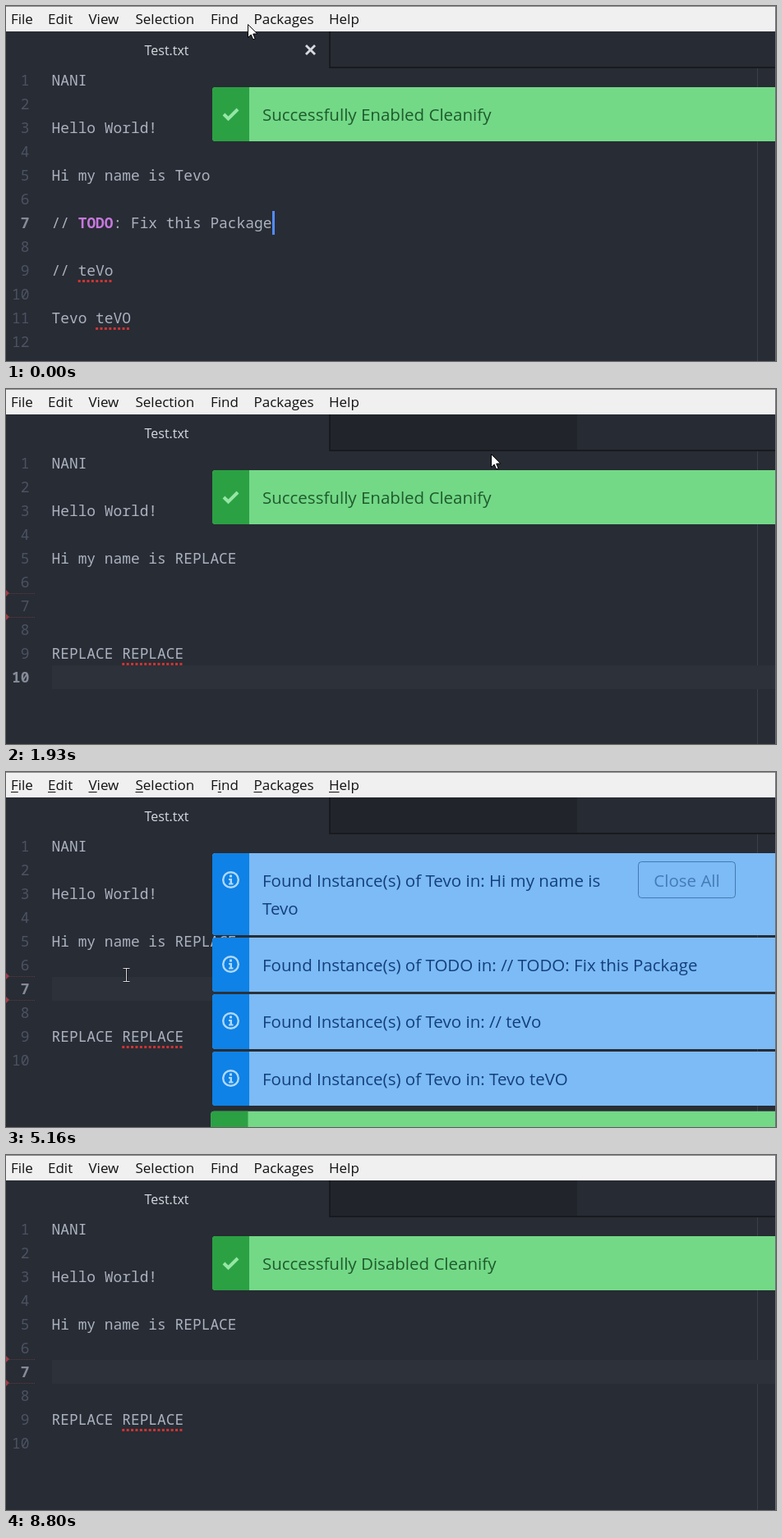
Recreate the animation shown at these times as an HTML page with a canvas. Size 937 by 433 pixels, loop 8890 ms.

```html
<!DOCTYPE html>
<html lang="en">
<head>
<meta charset="utf-8">
<title>Editor package demo</title>
<style>
  html, body { margin: 0; width: 100%; height: 100%; overflow: hidden; background: #282c34; }
  canvas { display: block; }
</style>
</head>
<body>
<canvas id="stage" width="937" height="433"></canvas>
<script>
const ctx = document.getElementById('stage').getContext('2d', { alpha: false });
const LOOP = 8890;
const UI = '"Open Sans", "Noto Sans", sans-serif';
const MONO = '17.87px "Noto Sans Mono", "DejaVu Sans Mono", monospace';
const MENU_FONT = `17px ${UI}`;
const TOAST_FONT = `20.5px ${UI}`;
const CHAR = 10.72, LINE = 29, TEXT_X = 55.5;
const TOAST_TOP = 98.7, TOAST_HEIGHT = 66.4, TOAST_GAP = 2.93, TOAST_ROW = 34;

// Moments at which the scene changes, in ms
const MENU_OPEN = 350, SUBMENU_OPEN = 1120, TRIGGERED = 1930, LINE_CLICK = 3860;
const ALT_DOWN = 4500, ALT_UP = 5600;
const CARET_TOGGLES = [0, 1930, 2540, 2950, 3350, 3750, 3860, 4220, 4560, 4900, 5240,
  5600, 5980, 6400, 6780, 7160, 7530, 7960, 8420, 8795];

const MOUSE_PATH = [
  [0, 294, 22], [90, 294, 22], [350, 345, 14], [790, 369, 82], [1140, 369, 82],
  [1440, 591, 79], [1690, 590, 79], [1930, 590, 79], [2390, 696, 362], [2540, 696, 362],
  [2630, 697, 363], [2910, 697, 363], [3770, 135, 250], [4830, 135, 250], [4920, 146, 247],
  [5900, 146, 247], [6150, 260, 212], [6520, 857, 406], [6745, 857, 406], [7050, 890, 445]
];

const MENU_BAR = [['File', 6, 0], ['Edit', 51, 0], ['View', 100.5, 0], ['Selection', 157.5, 0],
  ['Find', 249, 1], ['Packages', 301.5, 0], ['Help', 393, 0]];
const PACKAGES = ['Bracket Matcher', 'Cleanify', 'Command Palette', 'Dev Live Reload', 'Git Diff',
  'GitHub', 'Keybinding Resolver', 'Markdown Preview', 'Open On GitHub', 'Package Generator',
  'Settings View'];

const BEFORE = ['NANI', '', 'Hello World!', '', 'Hi my name is Tevo', '',
  '// TODO: Fix this Package', '', '// teVo', '', 'Tevo teVO', ''];
const AFTER = ['NANI', '', 'Hello World!', '', 'Hi my name is REPLACE', '', '', '',
  'REPLACE REPLACE', ''];

const SUCCESS = { icon: '#2ba143', body: '#73d987', text: '#1f5a2c', mark: '#95e6a4' };
const INFO = { icon: '#0e82e6', body: '#7cbbf5', text: '#143f7c', mark: '#b0d8fb' };
const found = (text, dies) => ({ style: INFO, text: `Found Instance(s) of ${text}`, born: 2010, dies });
const TOASTS = [
  { style: SUCCESS, text: 'Successfully Enabled Cleanify', born: -1000, dies: 3700 },
  found('Tevo in: Hi my name is\nTevo', 6732),
  found('TODO in: // TODO: Fix this Package', 6735.5),
  found('Tevo in: // teVo', 6735.5),
  found('Tevo in: Tevo teVO', 6735.5),
  { style: SUCCESS, text: 'Successfully Disabled Cleanify', born: 5065, dies: Infinity }
];

const clamp = v => Math.min(1, Math.max(0, v));
const smooth = v => v * v * (3 - 2 * v);
const backOut = v => 1 + 2.7 * (v - 1) ** 3 + 1.7 * (v - 1) ** 2;

function rect(x, y, w, h, color) {
  ctx.fillStyle = color;
  ctx.fillRect(x, y, w, h);
}

function text(str, x, y, font, color, align = 'left') {
  ctx.font = font;
  ctx.fillStyle = color;
  ctx.textAlign = align;
  ctx.fillText(str, x, y);
}

function polygon(points, color) {
  ctx.beginPath();
  points.forEach(([x, y]) => ctx.lineTo(x, y));
  ctx.closePath();
  ctx.fillStyle = color;
  ctx.fill();
}

function polyline(points, color, width) {
  ctx.beginPath();
  points.forEach(([x, y]) => ctx.lineTo(x, y));
  ctx.strokeStyle = color;
  ctx.lineWidth = width;
  ctx.stroke();
}

function mouseAt(t) {
  const i = MOUSE_PATH.findIndex(key => key[0] > t);
  if (i < 0) return MOUSE_PATH.at(-1).slice(1);
  const [t0, x0, y0] = MOUSE_PATH[i - 1], [t1, x1, y1] = MOUSE_PATH[i];
  const k = smooth((t - t0) / (t1 - t0));
  return [x0 + (x1 - x0) * k, y0 + (y1 - y0) * k];
}

function drawTabs(t) {
  rect(0, 0, 937, 433, '#282c34');
  rect(395, 31, 542, 44, '#272b33');
  if (t >= TRIGGERED) rect(395, 31, 300, 44, '#21252b');
  rect(393, 31, 2, 45, '#181a1f');
  rect(393, 74, 544, 2, '#181a1f');
  text('Test.txt', 195.5, 60, `500 16px ${UI}`, '#d7dae0', 'center');
  if (t < MENU_OPEN) {
    polyline([[365, 48], [376, 59]], '#d7dae0', 2.8);
    polyline([[376, 48], [365, 59]], '#d7dae0', 2.8);
  }
}

function misspelled(line, column, length) {
  const y = 74.5 + LINE * line;
  ctx.setLineDash([3, 2.4]);
  polyline([[TEXT_X + column * CHAR, y], [TEXT_X + (column + length) * CHAR, y]], '#cf3434', 3);
  ctx.setLineDash([]);
}

function drawEditor(t) {
  const edited = t >= TRIGGERED;
  const lines = edited ? AFTER : BEFORE;
  const active = edited && t < LINE_CLICK ? 10 : 7;
  const activeY = 76 + LINE * (active - 1);

  rect(914, 76, 1, 357, '#3a3f49');
  if (edited) {
    rect(56, activeY, 881, LINE, '#2c313a');
    for (const y of [249, 278]) {
      polygon([[0, y - 4], [4, y], [0, y + 4]], '#9c3d45');
      ctx.setLineDash([1, 1]);
      polyline([[4, y + .5], [35, y + .5]], '#5c3a42', 1);
      ctx.setLineDash([]);
    }
  }
  lines.forEach((line, i) => {
    const y = 97 + LINE * i;
    const isActive = i + 1 === active;
    text(i + 1, 28.5, y, `${isActive ? 600 : 400} ${MONO}`, isActive ? '#858b98' : '#4b5263', 'right');
    text(line.replace('TODO', '    '), TEXT_X, y, `500 ${MONO}`, '#abb2bf');
    const todo = line.indexOf('TODO');
    if (todo >= 0) text('TODO', TEXT_X + todo * CHAR, y, `600 ${MONO}`, '#c678dd');
  });
  if (edited) {
    misspelled(9, 8, 7);
  } else {
    misspelled(9, 3, 4);
    misspelled(11, 5, 4);
  }
  const toggles = CARET_TOGGLES.filter(time => time <= t).length;
  if (toggles % 2) rect(edited ? 56 : 324, activeY, 3, LINE, '#528bff');
}

function drawToast({ style, text: message, born, dies }, y, height, withButton, t) {
  const show = backOut(clamp((t - born) / 160));
  const hide = clamp((t - dies) / 120);
  const left = 251, width = 692, midX = left + width / 2, midY = y + height / 2;
  const scale = 1 - .2 * hide;

  ctx.save();
  ctx.globalAlpha = clamp(show) * (1 - hide);
  ctx.translate(midX, midY + 34 * (show - 1));
  ctx.scale(scale * (1 + .05 * (show - 1)), scale * Math.cos((1 - show) * Math.PI / 2));
  ctx.translate(-midX, -midY);

  ctx.beginPath();
  ctx.roundRect(left, y, width, height, 4);
  ctx.fillStyle = style.body;
  ctx.fill();
  ctx.beginPath();
  ctx.roundRect(left, y, 45, height, [4, 0, 0, 4]);
  ctx.fillStyle = style.icon;
  ctx.fill();

  if (style === SUCCESS) {
    polyline([[265, y + 33], [270.5, y + 38.5], [282, y + 27]], style.mark, 4);
  } else {
    ctx.beginPath();
    ctx.arc(273.5, y + 32.5, 9.3, 0, 7);
    ctx.strokeStyle = style.mark;
    ctx.lineWidth = 2.4;
    ctx.stroke();
    rect(272, y + 26.5, 3, 3, style.mark);
    rect(271, y + 31, 4, 2, style.mark);
    rect(272.5, y + 31, 2.5, 7, style.mark);
    rect(271, y + 36.5, 5.5, 2, style.mark);
  }

  const rows = height > 70 ? message.split('\n') : [message.replace('\n', ' ')];
  rows.forEach((row, i) => text(row, 312, y + 41 + TOAST_ROW * i, TOAST_FONT, style.text));

  if (withButton) {
    ctx.globalAlpha *= .52;
    ctx.beginPath();
    ctx.roundRect(769.5, y + 10.5, 118, 44, 4);
    ctx.strokeStyle = style.text;
    ctx.lineWidth = 1;
    ctx.stroke();
    text('Close All', 828.5, y + 41, TOAST_FONT, style.text, 'center');
  }
  ctx.restore();
}

// A closed toast fades for 120 ms, then its slot collapses at the end of the next 240 ms.
function drawToasts(t) {
  const present = TOASTS.filter(toast => t >= toast.born && t < toast.dies + 360);
  let y = TOAST_TOP;
  present.forEach((toast, i) => {
    const withButton = i === 0 && present.length > 1;
    const height = TOAST_HEIGHT + (withButton && toast.text.includes('\n') ? TOAST_ROW : 0);
    const top = Math.round(y), bottom = Math.round(y + height);
    drawToast(toast, top, bottom - top, withButton, t);
    y += (height + TOAST_GAP) * (1 - clamp((t - toast.dies - 310) / 50));
  });
}

function drawTooltip() {
  polygon([[188, 93], [195, 85], [202, 93]], '#4d78cc');
  ctx.beginPath();
  ctx.roundRect(-4, 93, 396, 50, 4);
  ctx.fillStyle = '#4d78cc';
  ctx.fill();
  text('C:\\Users\\nelvo\\Desktop\\dev\\C\\Test.txt', 17.5, 126, `19.5px ${UI}`, '#fff');
}

function drawMenuBar(t, open) {
  rect(0, 0, 937, 31, '#f0f0f0');
  if (open) {
    rect(293, 1, 92, 29, '#dadada');
    rect(385, 1, 160, 29, '#fff');
  }
  for (const [label, x, key] of MENU_BAR) {
    text(label, x, 22, MENU_FONT, '#111');
    if (t >= ALT_DOWN && t < ALT_UP) {
      const start = x + ctx.measureText(label.slice(0, key)).width;
      rect(start, 24, ctx.measureText(label[key]).width, 1, '#111');
    }
  }
}

function panel(x, y, w, h) {
  ctx.save();
  ctx.shadowColor = 'rgba(0,0,0,.6)';
  ctx.shadowBlur = 3;
  ctx.shadowOffsetX = ctx.shadowOffsetY = 2;
  rect(x, y, w, h, '#c8c8c8');
  ctx.restore();
  rect(x + 1, y + 1, w - 2, h - 2, '#fdfdfd');
}

function drawMenus(t, [mouseX, mouseY]) {
  panel(292, 28, 248, 420);
  if (mouseY >= 68) rect(294, 69, 241, 35, '#e9e9e9');
  else if (mouseY >= 32) rect(294, 33, 241, 35, '#e9e9e9');
  PACKAGES.forEach((label, i) => {
    const y = 51 + 36 * i;
    text(label, 333, y + 6, MENU_FONT, '#111');
    polygon([[513, y - 7], [521.5, y - 1], [513, y + 5]], '#484848');
  });
  if (t < SUBMENU_OPEN) return;
  panel(534, 62, 209, 80);
  if (mouseX > 536) rect(537, 68, 203, 36, '#e9e9e9');
  [['Trigger', 'Alt+Q', 651], ['Toggle', 'Alt+W', 646.5]].forEach(([label, keys, x], i) => {
    text(label, 574.5, 92 + 36 * i, MENU_FONT, '#111');
    text(keys, x, 92 + 36 * i, MENU_FONT, '#a6a6a6');
  });
}

function drawMouse(t, [x, y]) {
  ctx.save();
  ctx.translate(Math.round(x) + .5, Math.round(y) + .5);
  if (t > 3000 && x < 251) {
    for (const [color, width] of [['#1b1d22', 3], ['#d8dade', 1]]) {
      polyline([[0, -8], [0, 8]], color, width);
      polyline([[-4, -8], [4, -8]], color, width);
      polyline([[-4, 8], [4, 8]], color, width);
    }
  } else {
    polygon([[0, 0], [0, 16], [3.7, 12.5], [6.2, 18.3], [8.6, 17.3], [6.2, 11.6], [11.2, 11.4]], '#fff');
    ctx.strokeStyle = '#000';
    ctx.lineWidth = 1;
    ctx.stroke();
  }
  ctx.restore();
}

function draw(t) {
  const mouse = mouseAt(t);
  const menuOpen = t >= MENU_OPEN && t < TRIGGERED;
  drawTabs(t);
  drawEditor(t);
  drawToasts(t);
  if (menuOpen) drawTooltip();
  drawMenuBar(t, menuOpen);
  if (menuOpen) drawMenus(t, mouse);
  rect(0, 0, 937, 1, '#8c8c8c');
  rect(936, 0, 1, 433, '#6e7074');
  drawMouse(t, mouse);
}

const start = performance.now();
function tick() {
  draw((performance.now() - start) % LOOP);
  requestAnimationFrame(tick);
}
tick();
</script>
</body>
</html>
```
